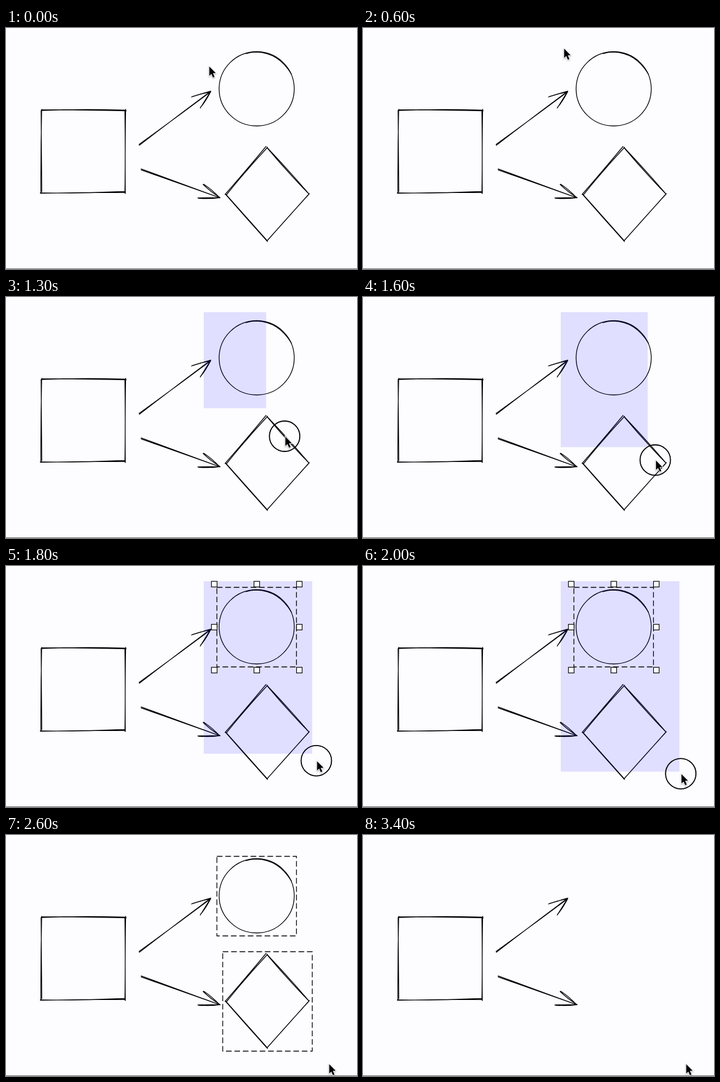
Recreate the animation shown at these times as an HTML page. Size 600 by 412 pixels, loop 4000 ms.

```html
<!DOCTYPE html>
<html lang="en">
<head>
<meta charset="utf-8">
<title>Box selection</title>
<style>
  html, body { margin: 0; width: 100%; height: 100%; overflow: hidden; background: #fdfcff; }
  svg { display: block; width: 600px; height: 412px; }
  .ink { fill: none; stroke: #000; stroke-width: 1.3; stroke-linecap: round; stroke-linejoin: round; }
  .frame { fill: none; stroke: #000; stroke-width: 1.3; stroke-dasharray: 9.6 4.8; }
  .handle { fill: #fff; stroke: #000; stroke-width: 1.2; }
  #pointer { filter: drop-shadow(0 1.5px 1.2px rgba(0, 0, 0, .35)); }
</style>
</head>
<body>
<svg viewBox="0 0 600 412">
  <g class="ink">
    <path d="M60 141Q130 138 205 140.3M61 139.6Q130 140 205.5 141.6
             M204.6 139Q203.2 200 204 283M203.2 141Q204.2 220 203.2 282
             M204 281.2Q130 281.2 59 282.6M203 279.5Q140 282.4 58.5 282
             M61 139Q59.4 210 59.6 282M60 141Q60.8 200 61.2 280"/>
    <path d="M228 200.5Q290 152.6 350 108M227.5 199Q287 156 350 109
             M350 108Q332 113 317 118M350 109Q334 112 318 117.4
             M350 108Q342 121 332 137M350 108.6Q341 126 332.6 135.5"/>
    <path d="M231 240.8L365 290M231 242.6L366 290.4
             M365 290Q353 277 338 267M365 289.4Q350 280 337 267.5
             M365 290Q346 290 328 290.5M366 290Q348 292.5 329 291"/>
  </g>
  <g id="targets" class="ink">
    <ellipse cx="428.5" cy="104" rx="64.2" ry="63.5"/>
    <path d="M410 44Q418 41 428 41Q466 42 488 79"/>
    <path d="M446 204Q484 244 518 284M446.5 205Q480 245 517 283
             M518.5 283Q483 323 446 364M517 285Q485 320 447 363
             M447 365Q410 324 375 284M445.5 362.5Q412 325 376 284.5
             M374.5 284.5Q410 244 444.5 202.5M377 285Q409 245 447 204"/>
  </g>
  <rect id="marquee" x="338" y="26" fill="rgba(0, 0, 255, .115)"/>
  <g id="roundFrame">
    <rect class="frame" x="360.5" y="36.5" width="136" height="136"/>
    <g id="handles"></g>
  </g>
  <rect id="diamondFrame" class="frame" x="370.5" y="199.5" width="153" height="170"/>
  <rect y="411" width="600" height="1" fill="#6c6c70"/>
  <circle id="ring" r="26" fill="none" stroke="#000" stroke-width="1.8"/>
  <path id="pointer" d="M.5 .8v16l3.6-3.4 2.8 6.3 2.7-1.2-2.8-6.2 4.8-.3z"
        stroke="#fff" stroke-width="1.8" paint-order="stroke"/>
</svg>
<script>
  const LOOP = 4000, TICK = 100, LAG = 57;
  const ORIGIN = { x: 338, y: 26 };
  const [targets, marquee, roundFrame, handles, diamondFrame, ring, pointer] =
    ['targets', 'marquee', 'roundFrame', 'handles', 'diamondFrame', 'ring', 'pointer']
      .map(id => document.getElementById(id));

  const linear = p => p;
  const smooth = p => p * p * (3 - 2 * p);
  const speedUp = p => p ** 4;
  const slowDown = p => 1 - (1 - p) ** 2.3;

  // Each key names the easing used on the way to it.
  const keys = [
    { t: 100, x: 346, y: 65 },
    { t: 700, x: 342, y: 32, ease: smooth },
    { t: 800, ...ORIGIN, ease: linear },
    { t: 1100, x: 366, y: 70, ease: speedUp },
    { t: 1300, x: 476, y: 238, ease: linear },
    { t: 1500, x: 476, y: 238, ease: linear },
    { t: 2100, x: 544, y: 357, ease: slowDown },
    { t: 2400, x: 551, y: 391, ease: slowDown }
  ];

  function position(t) {
    const next = keys.findIndex(key => key.t > t);
    if (next === 0) return keys[0];
    if (next < 0) return keys[keys.length - 1];
    const a = keys[next - 1], b = keys[next];
    const p = b.ease((t - a.t) / (b.t - a.t));
    return { x: a.x + (b.x - a.x) * p, y: a.y + (b.y - a.y) * p };
  }

  // Eight handles around the circle's frame, none in the middle.
  for (let i = 0; i < 9; i++) {
    if (i === 4) continue;
    const x = 351.2 + 72.7 * (i % 3), y = 26.2 + 73.5 * Math.floor(i / 3);
    handles.insertAdjacentHTML('beforeend',
      `<rect class="handle" x="${x}" y="${y}" width="9.6" height="9.6"/>`);
  }

  const show = (node, on) => node.setAttribute('display', on ? 'inline' : 'none');
  const place = (node, x, y) => node.setAttribute('transform', `translate(${x} ${y})`);

  function draw(now) {
    const t = Math.floor(now % LOOP / TICK) * TICK;
    const tip = position(t), corner = position(t - LAG);
    const covers = (right, bottom) => t >= 900 && corner.x >= right && corner.y >= bottom;
    const dragging = t >= 800 && t < 2600, present = t < 3400;
    const roundPicked = covers(493, 168), diamondPicked = covers(519, 365);

    place(pointer, tip.x + 1, tip.y);
    place(ring, tip.x + .3, tip.y);
    marquee.setAttribute('width', Math.max(0, corner.x - ORIGIN.x));
    marquee.setAttribute('height', Math.max(0, corner.y - ORIGIN.y));

    show(ring, dragging);
    show(marquee, dragging && t >= 900);
    show(roundFrame, roundPicked && present);
    show(handles, !diamondPicked);
    show(diamondFrame, diamondPicked && present);
    show(targets, present);
  }

  const start = performance.now();
  function loop() {
    draw(performance.now() - start);
    requestAnimationFrame(loop);
  }
  loop();
</script>
</body>
</html>
```
